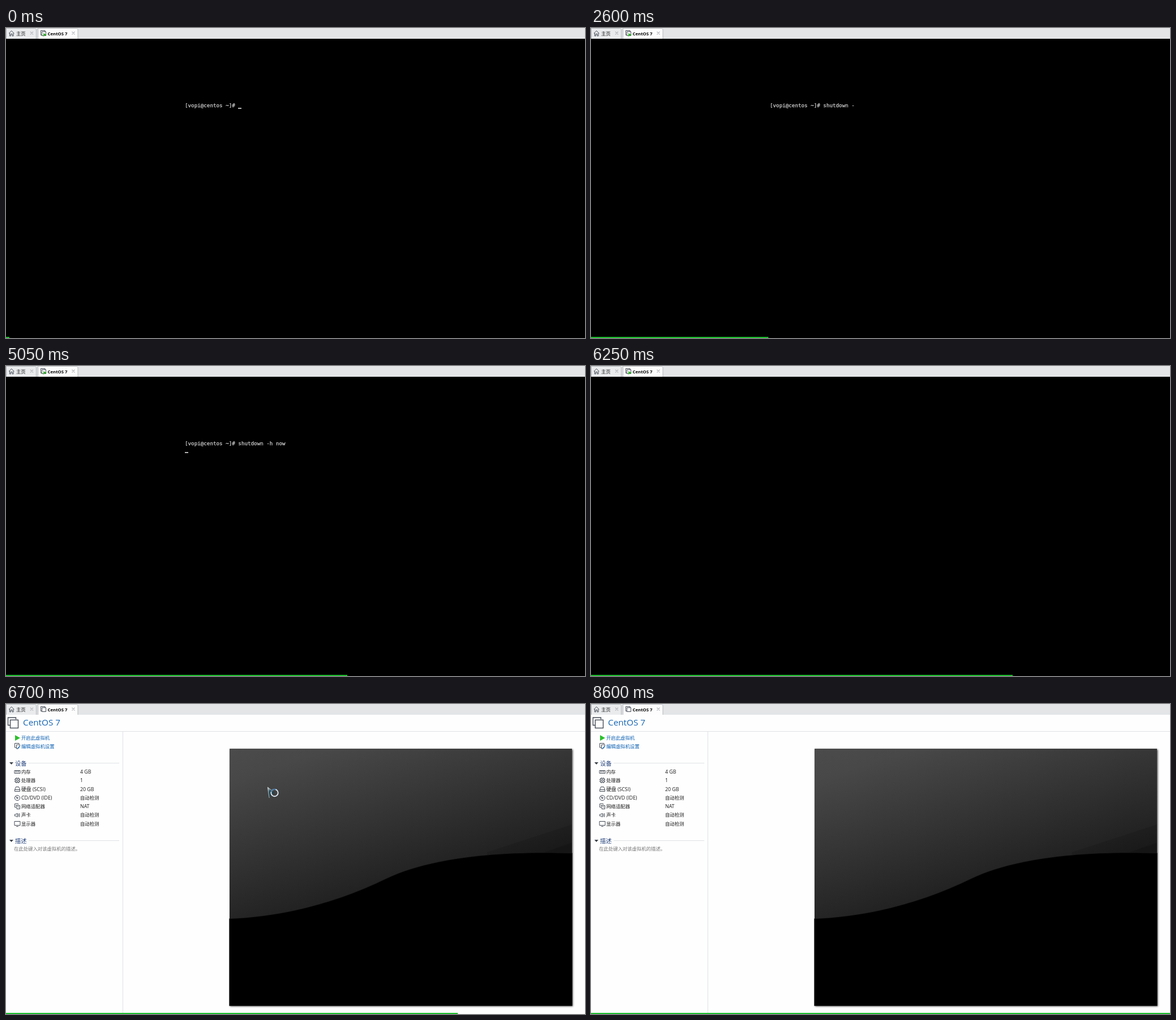
An HTML page for the animation above (8.65 s loop, 1023 by 548 pixels).

```html
<!DOCTYPE html>
<html lang="zh">
<head>
<meta charset="utf-8">
<title>CentOS 7</title>
<style>
  html, body { margin: 0; width: 100%; height: 100%; overflow: hidden; background: #000; }
  svg { display: block; width: 1023px; height: 548px; }
  text { font: 8.4px "Open Sans", "Noto Sans CJK SC", "Noto Sans CJK", sans-serif; fill: #1c1c1c; white-space: pre; }
  .term text { font: 9.22px "DejaVu Sans Mono", monospace; fill: #cfcfcf; stroke: #cfcfcf; stroke-width: .25; }
  .bold { font-weight: 700; font-size: 7.8px; fill: #000; }
  .title { font-size: 15.3px; fill: #1565b3; }
  .link { fill: #0f62b4; }
  .head { font-size: 10.2px; fill: #24427c; }
  .note { fill: #777; }
  .latin { font-size: 8.8px; }
  .icon { fill: none; stroke: #444b55; }
  .rule { stroke: #dfe1e4; }
  .close { stroke: #b4b6ba; stroke-width: 1.2; }
</style>
</head>
<body>
<svg viewBox="0 0 1023 548">
  <defs>
    <linearGradient id="sky" gradientUnits="userSpaceOnUse" x1="395" y1="79" x2="496" y2="415">
      <stop offset="0" stop-color="#4b4b4b"/>
      <stop offset=".15" stop-color="#484848"/>
      <stop offset=".5" stop-color="#363636"/>
      <stop offset=".82" stop-color="#252525"/>
      <stop offset="1" stop-color="#1b1b1b"/>
    </linearGradient>
    <linearGradient id="steel" x1="0" y1="0" x2=".6" y2="1">
      <stop offset="0" stop-color="#e4eaec"/>
      <stop offset=".4" stop-color="#32505c"/>
      <stop offset="1" stop-color="#0d3240"/>
    </linearGradient>
    <filter id="soft" x="-5%" y="-5%" width="110%" height="110%">
      <feGaussianBlur stdDeviation="1.6"/>
    </filter>
  </defs>

  <rect width="1023" height="548"/>

  <g class="term" id="term">
    <text id="line" x="316" y="140"></text>
    <rect id="caret" width="6" height="2" fill="#b4b4b4"/>
  </g>

  <rect id="blank" x="12" y="250" width="190" height="298" fill="#fff"/>

  <g id="details">
    <rect y="19" width="1023" height="529" fill="#fefefe"/>
    <path class="rule" d="M0 48.5H1023M206.5 49V546M40 104.5H200M40 241.5H200"/>
    <g class="icon" stroke-width="1.4">
      <path d="M7 37.5H3.5V24H17.5V27"/>
      <rect x="7.5" y="28.2" width="14" height="14.3"/>
    </g>
    <text class="title" x="30" y="38">CentOS 7</text>
    <path d="M16 55L25 60L16 65Z" fill="#2bc02b"/>
    <text class="link" x="27" y="63">开启此虚拟机</text>
    <path class="icon" d="M18 77H15.5V69.5H23V71M24.5 74V72H18.5V79H21"/>
    <path d="M20.5 79L24.5 74.5" stroke="#1565b3" stroke-width="1.6"/>
    <text class="link" x="27" y="77.5">编辑虚拟机设置</text>
    <path d="M6 103H13L9.5 107ZM6 240H13L9.5 244Z" fill="#3a4048"/>
    <text class="head" x="16" y="108.5">设备</text>
    <text class="head" x="16" y="245.5">描述</text>
    <text class="note" x="14" y="259">在此处键入对该虚拟机的描述。</text>
    <g id="rows"></g>
    <g class="icon">
      <path d="M15 117.5H25V122.5H15ZM17.5 118V121M20 118V121M22.5 118V121"/>
      <path d="M16.5 131.5H23.5V138.5H16.5ZM18.5 133.5H21.5V136.5H18.5ZM18.5 130V131M21.5 130V131M18.5 139V140M21.5 139V140M15 133.5H16M15 136.5H16M24 133.5H25M24 136.5H25"/>
      <path d="M15.5 151.5L17.5 146.5H22.5L24.5 151.5V154.5H15.5ZM15.5 151.5H24.5"/>
      <circle cx="20" cy="166" r="4.6"/><circle cx="20" cy="166" r="1.3"/><path d="M17 163L19 165"/>
      <path d="M18 182.5H15.5V176.5H21.5V178M19 179.5H24.5V185.5H19ZM17 179.5H21M21 181L23 183"/>
      <path d="M15.5 195H17.5L20 193V200L17.5 198H15.5ZM21.5 194.5Q23 196.5 21.5 198.5M23 193Q25.4 196.5 23 200"/>
      <path d="M15 207.5H25V214.5H15ZM18 216.5H22"/>
    </g>
    <rect x="396" y="80.5" width="605.5" height="454" fill="#555" filter="url(#soft)"/>
    <rect x="395" y="79" width="605" height="454" fill="url(#sky)"/>
    <path d="M1000 213L850 262V272H1000Z" fill="#000" opacity=".13"/>
    <path d="M1000 245L945 264H1000Z" fill="#000" opacity=".14"/>
    <path d="M395 380C495 376 590 349 672 309C738 277 850 259 1000 264V533H395Z" stroke="#191919" stroke-width="1.4"/>
    <path d="M395 380C495 376 590 349 672 309C738 277 850 259 1000 264V533H395Z"/>
  </g>

  <g>
    <rect width="1023" height="19" fill="#e3e5e7"/>
    <path d="M.5 19V.5H51.5L53.5 2.5V19" fill="#e9ebed" stroke="#b3b6ba"/>
    <path d="M56.5 19V.5H125L127 2.5V19" fill="#fdfdfd" stroke="#b3b6ba"/>
    <path class="icon" d="M5 9.5L9.7 5L14.4 9.5M6.5 9V14H8.5V10.5H11V14H13V9"/>
    <text x="18" y="12.7" fill="#000">主页</text>
    <path class="close" d="M43 6.5L48 11.5M48 6.5L43 11.5M116.5 6.5L121.5 11.5M121.5 6.5L116.5 11.5"/>
    <path class="icon" d="M63 12.5H61.5V4.5H69V6M63.5 6.5H70.5V13.5H63.5Z"/>
    <path id="play" d="M66 9L72 12L66 15Z" fill="#35b02f"/>
    <text class="bold" x="73.5" y="12.5">CentOS 7</text>
  </g>

  <g id="mouse">
    <path d="M462.3 147L475 157.5L469 159L465.2 166Z" fill="url(#steel)"/>
    <path d="M462.3 147L465.2 166M462.3 147L471 154" stroke="#cfd8da" stroke-width=".8"/>
    <circle cx="474.5" cy="157" r="6.2" fill="none" stroke="#dce9f4" stroke-width="1.9"/>
    <path id="arc" d="M468.3 157A6.2 6.2 0 0 1 474.5 150.8" fill="none" stroke="#3d6f9c" stroke-width="1.9"/>
  </g>

  <rect id="bar" y="546" height="2" fill="#1bbf2b"/>
</svg>
<script>
const FRAME = 50, COUNT = 173, BLINK = 533, CELL = 5.55;
const PROMPT = "[vopi@centos ~]# ", COMMAND = "shutdown -h now";
const KEYS = [350, 550, 700, 1000, 1250, 1400, 1550, 1750, 2100, 2500, 2900, 3300, 3750, 4000, 4200];
const ENTER = 4700, CLEAR = 5250, CARET_OFF = 5950, MOUSE_ON = 6350, BLANK_ON = 6500, OFF = 6700, MOUSE_OFF = 7700;

const $ = id => document.getElementById(id);
const show = (id, on) => $(id).setAttribute("visibility", on ? "visible" : "hidden");

const devices = [["内存", "4 GB"], ["处理器", "1"], ["硬盘 (SCSI)", "20 GB"], ["CD/DVD (IDE)", "自动检测"],
  ["网络适配器", "NAT"], ["声卡", "自动检测"], ["显示器", "自动检测"]];

function label(text, x, y) {
  const el = document.createElementNS("http://www.w3.org/2000/svg", "text");
  el.textContent = text;
  el.setAttribute("x", x);
  el.setAttribute("y", y);
  if (/[A-Z0-9]/.test(text)) el.setAttribute("class", "latin");
  $("rows").append(el);
}
devices.forEach(([name, value], i) => {
  const y = 123.2 + i * 15.25;
  label(name, 27, y);
  label(value, 131, y);
});

function drawTerminal(t) {
  const typed = KEYS.filter(k => k <= t).length;
  const cleared = t >= CLEAR;
  const column = t >= ENTER ? 0 : PROMPT.length + typed;
  $("line").textContent = cleared ? "" : PROMPT + COMMAND.slice(0, typed);
  $("caret").setAttribute("x", Math.round(316 + column * CELL));
  $("caret").setAttribute("y", t >= ENTER && !cleared ? 152 : 141);
  show("caret", t < CARET_OFF && t % BLINK < BLINK / 2);
}

function draw(t) {
  const step = Math.floor(t / FRAME) % COUNT;
  const now = step * FRAME;
  drawTerminal(now);
  show("blank", now >= BLANK_ON && now < OFF);
  show("details", now >= OFF);
  show("play", now < OFF);
  show("mouse", now >= MOUSE_ON && now < MOUSE_OFF);
  $("arc").setAttribute("transform", `rotate(${(now - BLANK_ON) * 0.36 - 54} 474.5 157)`);
  $("bar").setAttribute("width", 1023 * (step + 1) / COUNT);
}

const start = performance.now();
function tick() {
  draw(performance.now() - start);
  requestAnimationFrame(tick);
}
tick();
</script>
</body>
</html>
```
